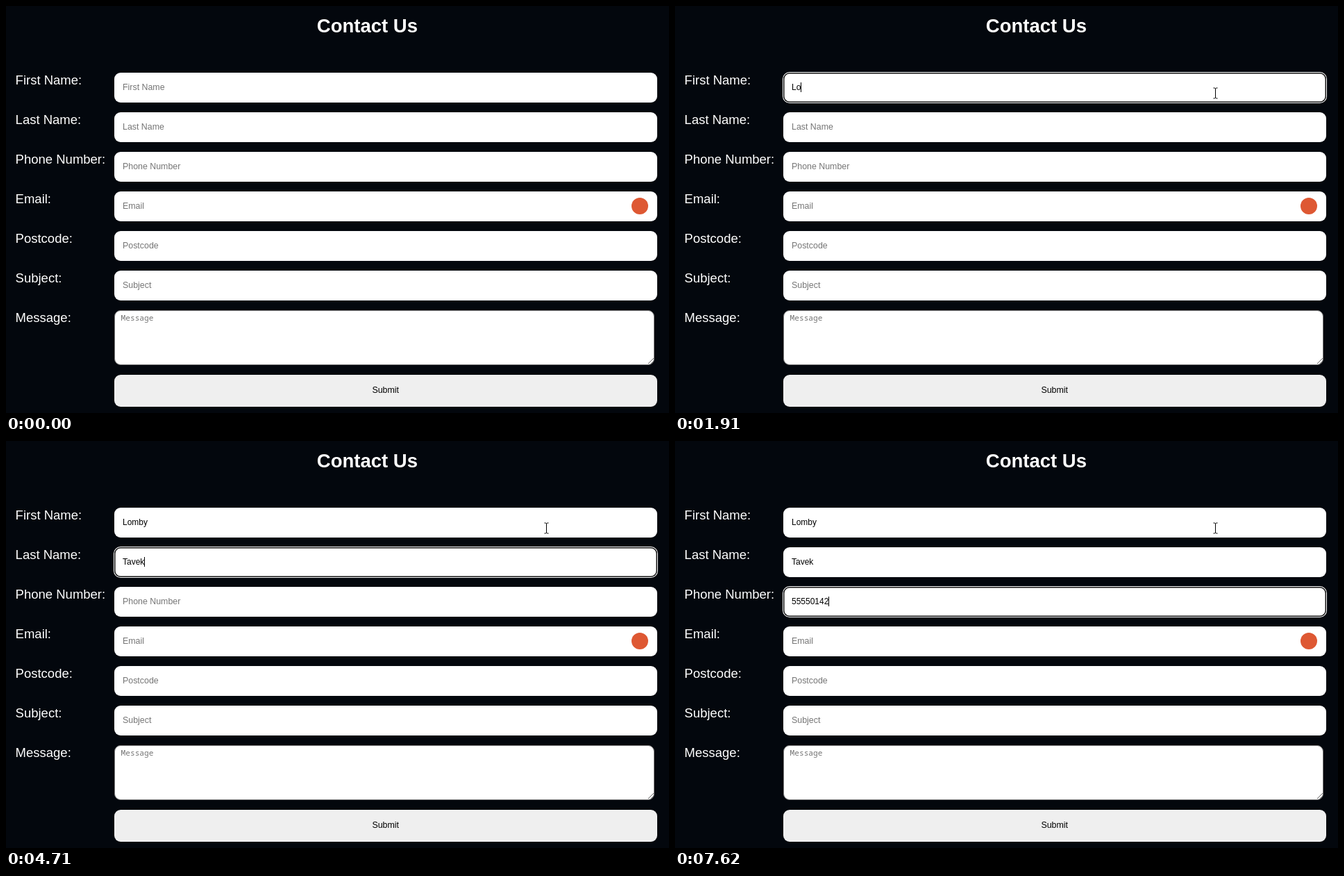
Recreate the animation shown at these times as an HTML page. Size 955 px wide and 586 px high, loop 8000 ms.

```html
<!DOCTYPE html>
<html lang="en">
<head>
<meta charset="utf-8">
<title>Contact form</title>
<style>
  html, body { margin: 0; width: 955px; height: 586px; overflow: hidden; background: #03070d; }
  body { position: relative; font-family: "Liberation Sans", Arial, sans-serif; color: #fff; }
  body * { box-sizing: border-box; white-space: pre; }
  h1 { position: absolute; left: 447.8px; top: 12px; margin: 0; font-size: 27.5px; line-height: 33px; }
  .row { position: absolute; left: 0; width: 955px; height: 47px; }
  .row > * { position: absolute; }
  .label { left: 13.6px; top: 0; font-size: 18.5px; line-height: 21px; }
  .field { left: 156px; top: 0; width: 781.5px; height: 43px; padding-left: 12px; border-radius: 9px;
    background: #fff; color: #000; font-size: 12px; line-height: 43px; }
  .focused { box-shadow: 0 0 0 1px #fff, inset 0 0 0 1.5px #101010; }
  .invalid { left: 157px; top: 1px; width: 783px; height: 45px; padding-left: 13px; line-height: 45px; }
  .hint { color: #757575; font-size: 12.4px; }
  .caret { display: inline-block; width: 1px; height: 14px; margin-right: -1px; vertical-align: -3px; background: #000; }
  .badge { left: 901px; top: 9px; width: 24px; height: 24px; border-radius: 50%; background: #de5833; }
  .area { left: 156px; top: 0; width: 778px; height: 79px; padding: 3px 0 0 8.5px; border: 1px solid #767676;
    border-radius: 9px; background: #fff; color: #757575; font: 11.2px/14px "Noto Sans Mono", monospace; }
  .grip { left: 925px; top: 69px; }
  .submit { left: 156px; top: 0; width: 781.5px; height: 46px; border-radius: 9px; background: #efefef;
    color: #000; font-size: 12.4px; line-height: 45px; text-align: center; }
  .pointer { position: absolute; left: 0; top: 0; overflow: visible; }
</style>
</head>
<body>
<h1>Contact Us</h1>
<svg class="pointer" width="1" height="1">
  <path id="arrow" d="M0 0V16L3.8 12.5L6.5 18.5L9 17.5L6.3 11.6H11.5Z" fill="#fff" stroke="#000" stroke-width=".8"/>
  <path id="beam" d="M-3 -7.5H-1L0 -6.5L1 -7.5H3M0 -6.5V6.5M-3 7.5H-1L0 6.5L1 7.5H3" fill="none" stroke="#000"/>
</svg>
<script>
const LOOP = 8000, TOP = 96, PITCH = 57, GROWTH = 4;

// A field with fewer than `min` typed characters is invalid and grows.
const rows = [
  { name: 'First Name', text: 'Lomby', min: 2, focus: 790, blur: 3090, keys: [1540, 1910, 2210, 2410, 2730] },
  { name: 'Last Name', text: 'Tavek', min: 2, focus: 3090, blur: 5210, keys: [3590, 3980, 4220, 4400, 4710] },
  { name: 'Phone Number', text: '55550142', min: 8, focus: 5210, blur: LOOP,
    keys: [5950, 6140, 6380, 6570, 6810, 7060, 7310, 7620] },
  { name: 'Email', badge: true },
  { name: 'Postcode' },
  { name: 'Subject' },
  { name: 'Message', area: true },
  { name: 'Submit', button: true }
];

function add(parent, tag, className, text = '') {
  const el = document.createElement(tag);
  el.className = className;
  el.textContent = text;
  parent.append(el);
  return el;
}

const pointer = document.querySelector('.pointer');
const arrow = document.getElementById('arrow');
const beam = document.getElementById('beam');

for (const row of rows) {
  row.el = add(document.body, 'div', 'row');
  if (row.button) {
    add(row.el, 'div', 'submit', row.name);
    continue;
  }
  add(row.el, 'div', 'label', row.name + ':');
  if (row.area) {
    add(row.el, 'div', 'area', row.name);
    row.el.insertAdjacentHTML('beforeend',
      '<svg class="grip" width="8" height="8"><path d="M0 8L8 0M4 8L8 4" stroke="#666"/></svg>');
    continue;
  }
  row.field = add(row.el, 'div', 'field');
  row.typed = add(row.field, 'span', '');
  row.caret = add(row.field, 'i', 'caret');
  row.hint = add(row.field, 'span', 'hint', row.name);
  if (row.badge) add(row.el, 'div', 'badge');
}
document.body.append(pointer);

function drawRows(t) {
  let top = TOP;
  for (const { el, field, typed, caret, hint, text = '', min, focus, blur, keys = [] } of rows) {
    el.style.top = top + 'px';
    top += PITCH;
    if (!field) {
      top += el.querySelector('.area') ? 36 : 0;
      continue;
    }
    const pressed = keys.filter(k => k <= t);
    const count = pressed.length;
    const focused = t >= focus && t < blur;
    const invalid = count > 0 && count < min;
    const idle = t - (count ? pressed[count - 1] : focus);
    field.classList.toggle('focused', focused);
    field.classList.toggle('invalid', invalid);
    typed.textContent = text.slice(0, count);
    hint.hidden = count > 0;
    caret.style.visibility = focused && idle % 1000 < 500 ? 'visible' : 'hidden';
    if (invalid) top += GROWTH;
  }
}

function drawPointer(t) {
  const step = Math.min(5, Math.floor((t - 230) / 62));
  const rest = (1 - step / 5) ** 2;
  const x = 778.5 + 159.5 * rest, y = 125.5 + 5.5 * rest;
  pointer.style.display = step < 0 ? 'none' : 'block';
  arrow.style.display = step === 0 ? 'inline' : 'none';
  beam.style.display = step > 0 ? 'inline' : 'none';
  for (const shape of [arrow, beam]) shape.setAttribute('transform', `translate(${x} ${y})`);
}

function frame() {
  const t = performance.now() % LOOP;
  drawRows(t);
  drawPointer(t);
  requestAnimationFrame(frame);
}
frame();
</script>
</body>
</html>
```
